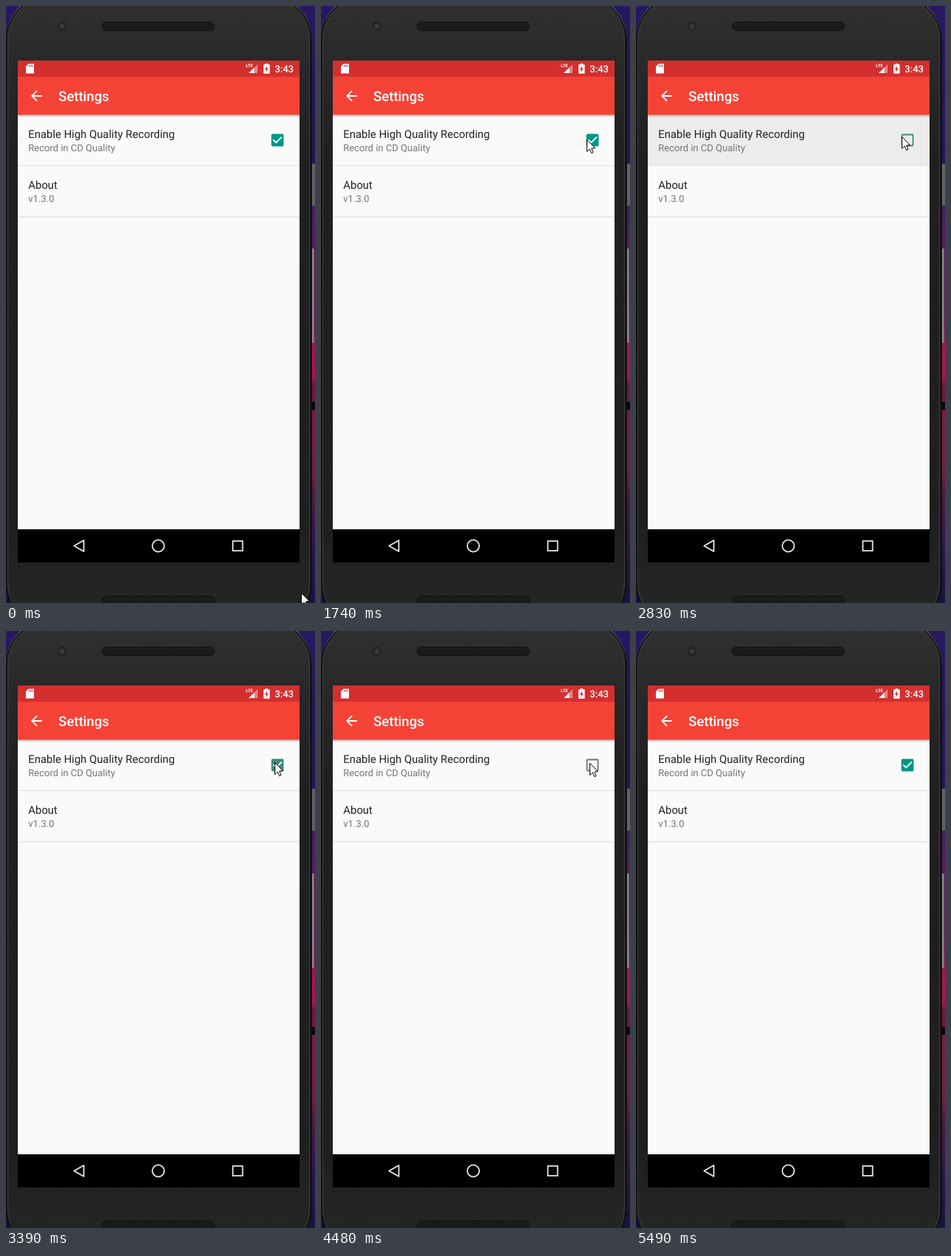
These frames come from a looping animation (420 px wide and 810 px high, 8120 ms). An HTML page with a canvas:

```html
<!DOCTYPE html>
<html lang="en">
<head>
<meta charset="utf-8">
<title>Settings</title>
<style>
html, body { margin: 0; width: 100%; height: 100%; overflow: hidden; background: #111; }
canvas { display: block; width: 420px; height: 810px; }
</style>
</head>
<body>
<canvas id="stage"></canvas>
<script>
const W = 420, H = 810, LOOP = 8120;
const canvas = document.getElementById('stage');
const ratio = window.devicePixelRatio || 1;
canvas.width = W * ratio;
canvas.height = H * ratio;
const c = canvas.getContext('2d');
c.textRendering = 'geometricPrecision';

const TEAL = '#009688';
const PRESSES = [1660, 2690, 3700, 4710];
// start, ms per step, steps, end x, end y
const MOVES = [
  [70, 70, 5, 387, 78],
  [580, 77, 8, 363, 201],
  [1196, 77, 3, 361, 184],
  [1430, 80, 2, 361, 181],
  [2370, 80, 2, 361, 177],
  [3150, 80, 3, 365, 178],
  [3550, 80, 1, 365, 179],
  [5330, 80, 2, 387, 203]
];
const CURSOR_GONE = 5490;
const ROW = { x: 16, y: 147.5, w: 383, h: 68.5 };

const clamp = v => Math.max(0, Math.min(1, v));
const mix = (a, b, p) => a + (b - a) * p;

function rect(x, y, w, h, fill) {
  c.fillStyle = fill;
  c.fillRect(x, y, w, h);
}

function round(x, y, w, h, r, fill) {
  c.beginPath();
  c.roundRect(x, y, w, h, r);
  c.fillStyle = fill;
  c.fill();
}

function disc(x, y, r, fill) {
  c.beginPath();
  c.arc(x, y, r, 0, Math.PI * 2);
  c.fillStyle = fill;
  c.fill();
}

function poly(points, fill) {
  c.beginPath();
  points.forEach(([x, y]) => c.lineTo(x, y));
  c.closePath();
  if (fill) {
    c.fillStyle = fill;
    c.fill();
  }
}

function gradient(y0, y1, stops) {
  const g = c.createLinearGradient(0, y0, 0, y1);
  stops.forEach(([y, color]) => g.addColorStop((y - y0) / (y1 - y0), color));
  return g;
}

function text(str, x, y, size, color, weight = 400) {
  c.font = `${weight} ${size}px Roboto, sans-serif`;
  c.fillStyle = color;
  c.fillText(str, x, y);
}

// 24-unit icon path centred on a point
function icon(path, x, y, scale, fill) {
  c.save();
  c.translate(x, y);
  c.scale(scale, scale);
  c.translate(-12, -12);
  c.fillStyle = fill;
  c.fill(new Path2D(path));
  c.restore();
}

function grille(y) {
  round(130, y, 154, 13, 6.5, '#151515');
  c.save();
  c.beginPath();
  c.roundRect(131, y + 1, 152, 11, 5.5);
  c.clip();
  for (let row = 0; row < 4; row++) {
    for (let x = 132 + (row % 2) * 1.5; x < 283; x += 3) {
      rect(x, y + 2 + row * 2.6, 1.3, 1.3, '#333');
    }
  }
  c.restore();
}

function drawDesktop() {
  rect(0, 0, W, H, gradient(0, H, [
    [0, '#281763'], [200, '#27135e'], [300, '#4f1f66'], [440, '#7c1a5c'],
    [470, '#b4134f'], [505, '#ad144e'], [515, '#6d1640'], [560, '#7c1a4c'],
    [640, '#701c4a'], [660, '#4c1a48'], [740, '#2b1450'], [H, '#1a1146']
  ]));
  rect(416, 537, 4, 11, '#08060a');
  rect(416, 214, 4, 57, '#626264');
  rect(416, 329, 2.5, 128, '#8b8b8d');
}

// Phone outline, shrunk by an inset
function shell(inset) {
  c.beginPath();
  c.roundRect(-1 + inset, -15 + inset, 417 - 2 * inset, 859 - 2 * inset, 60 - inset);
}

function drawPhone() {
  shell(0);
  c.fillStyle = '#121212';
  c.fill();
  shell(3);
  c.fillStyle = gradient(0, H, [
    [0, '#303030'], [74, '#292929'], [200, '#202020'], [700, '#1f1f1f'], [H, '#252525']
  ]);
  c.fill();
  c.lineWidth = 1;
  c.strokeStyle = '#414141';
  shell(3.5);
  c.stroke();
  c.strokeStyle = gradient(0, 50, [[0, '#8a8496'], [50, 'rgba(70,70,74,0)']]);
  shell(0.5);
  c.stroke();
  grille(21);
  grille(800);
  disc(76, 27.5, 6.5, '#242424');
  disc(76, 27.5, 3.5, '#383838');
}

function drawStatusBar() {
  rect(16, 74, 383, 22, '#d32f2f');
  poly([[30.5, 78.5], [38, 78.5], [38, 91.5], [27, 91.5], [27, 82]], '#fff');
  for (let i = 0; i < 3; i++) rect(31 + i * 2.2, 80, 1.1, 2.6, '#d32f2f');
  poly([[342, 79], [342, 91], [330, 91]], 'rgba(255,255,255,.4)');
  poly([[337.5, 83.5], [337.5, 91], [330, 91]], '#fff');
  text('LTE', 326, 83, 6, '#fff', 700);
  rect(352.5, 78, 3.5, 2, '#fff');
  round(350, 79.3, 8.5, 12.5, 1, '#fff');
  poly([[355, 81], [351.8, 86.3], [353.8, 86.3], [353.4, 90], [356.7, 84.8], [354.7, 84.8]], '#d32f2f');
  text('3:43', 365.3, 90, 13.05, '#fff', 500);
}

function drawToolbar() {
  rect(16, 147.5, 383, 4, gradient(147.5, 151.5, [[147.5, 'rgba(0,0,0,.24)'], [151.5, 'rgba(0,0,0,0)']]));
  rect(16, 96, 383, 51.7, '#f44336');
  icon('M20 11H7.83l5.59-5.59L12 4l-8 8 8 8 1.41-1.41L7.83 13H20v-2z', 41.5, 122, 0.932, '#fff');
  text('Settings', 71.2, 129.2, 18.64, '#fff', 500);
}

function drawNav() {
  rect(16, 710, 383, 45, '#000');
  c.strokeStyle = '#e8e8e8';
  c.lineWidth = 1.8;
  c.lineJoin = 'round';
  poly([[92.5, 732.5], [105.7, 725], [105.7, 740]]);
  c.stroke();
  c.beginPath();
  c.arc(207, 732.5, 8.1, 0, Math.PI * 2);
  c.stroke();
  c.strokeRect(308.3, 725.9, 13.3, 13.3);
}

// Latest press: its index and repaint step (-1 before release)
function pressAt(t) {
  const index = PRESSES.filter(p => t >= p).length - 1;
  if (index < 0) return { index, step: 8 };
  const age = t - PRESSES[index];
  const start = index === 1 ? 140 : 150;
  const step = age < start ? -1 : Math.min(8, Math.floor((age - start + 1) / 78.5));
  return { index, step };
}

function drawRipple({ index, step }) {
  if (index < 0 || step > 6) return;
  const tip = index === 0 ? [361, 181] : index === 1 ? [361, 177] : [365, 179];
  c.save();
  c.beginPath();
  c.rect(ROW.x, ROW.y, ROW.w, ROW.h);
  c.clip();
  if (step < 0) {
    disc(tip[0], tip[1], 15, 'rgba(0,0,0,.012)');
  } else {
    const fade = clamp((7 - step) / 5);
    const tint = step === 0 ? 0.056 : 0.104 * fade;
    rect(ROW.x, ROW.y, ROW.w, ROW.h, `rgba(0,0,0,${tint})`);
    if (step > 0) {
      const grow = Math.min(1, 0.245 * step ** 1.2);
      disc(mix(tip[0], 207.5, grow), mix(tip[1], 182, grow), 194.6 * grow, `rgba(0,0,0,${0.1 * fade * fade})`);
    }
  }
  c.restore();
}

function drawCheckbox({ index, step }) {
  const wasOn = index < 0 || index % 2 === 0;
  const on = step < 0 ? wasOn : index < 0 || !wasOn;
  let color = on ? (index === 1 && step < 8 ? '#3f8a82' : TEAL) : '#737373';
  if (!on && step >= 0 && step < 3) color = '#6a6265';
  if (step === 0 && !on) color = TEAL;

  let hole = 0, tick = 0;
  if (step <= 0) {
    hole = wasOn ? 0 : 1;
    tick = 1 - hole;
  } else {
    const p = clamp((step - 1) / 3);
    if (on) tick = p;
    else hole = p;
  }

  const x = 369, y = 182;
  c.beginPath();
  c.roundRect(x - 8.4, y - 8.4, 16.8, 16.8, 1.8);
  if (hole) {
    const s = 13.2 * hole;
    c.rect(x - s / 2, y - s / 2, s, s);
  }
  c.fillStyle = color;
  c.fill('evenodd');
  if (tick) {
    icon('M10 17l-5-5 1.41-1.41L10 14.17l7.59-7.59L19 8z', x, y, 0.932 * tick, '#fff');
  }
}

function drawList(press) {
  rect(16, 147, 383, 563, '#fafafa');
  drawRipple(press);
  rect(16, 216, 383, 1, '#dedede');
  rect(16, 285.5, 383, 1, '#dadada');
  text('Enable High Quality Recording', 30.3, 179, 14.9, '#212121');
  text('Record in CD Quality', 30.3, 197.2, 13.05, '#757575');
  text('About', 30.3, 248.2, 14.9, '#212121');
  text('v1.3.0', 30.3, 266.4, 13.05, '#757575');
  drawCheckbox(press);
}

function drawCursor(t) {
  if (t >= CURSOR_GONE) return;
  let x = 401, y = 796;
  for (const [start, gap, count, endX, endY] of MOVES) {
    if (t < start) break;
    const p = Math.min(count, Math.floor((t - start) / gap) + 1) / count;
    x = mix(x, endX, p);
    y = mix(y, endY, p);
  }
  c.save();
  c.translate(Math.round(x) + 0.5, Math.round(y) + 0.5);
  poly([[0, 0], [0, 16], [3.7, 12.6], [6.2, 18.2], [8.5, 17.2], [6.2, 11.5], [11, 11.2]], '#fff');
  c.strokeStyle = '#000';
  c.lineWidth = 1;
  c.lineJoin = 'miter';
  c.stroke();
  c.restore();
}

function draw(t) {
  c.setTransform(ratio, 0, 0, ratio, 0, 0);
  drawDesktop();
  drawPhone();
  drawList(pressAt(t));
  drawToolbar();
  drawStatusBar();
  drawNav();
  drawCursor(t);
}

const begin = performance.now();
function frame(now) {
  draw(Math.max(0, now - begin) % LOOP);
  requestAnimationFrame(frame);
}
draw(0);
requestAnimationFrame(frame);
</script>
</body>
</html>
```
